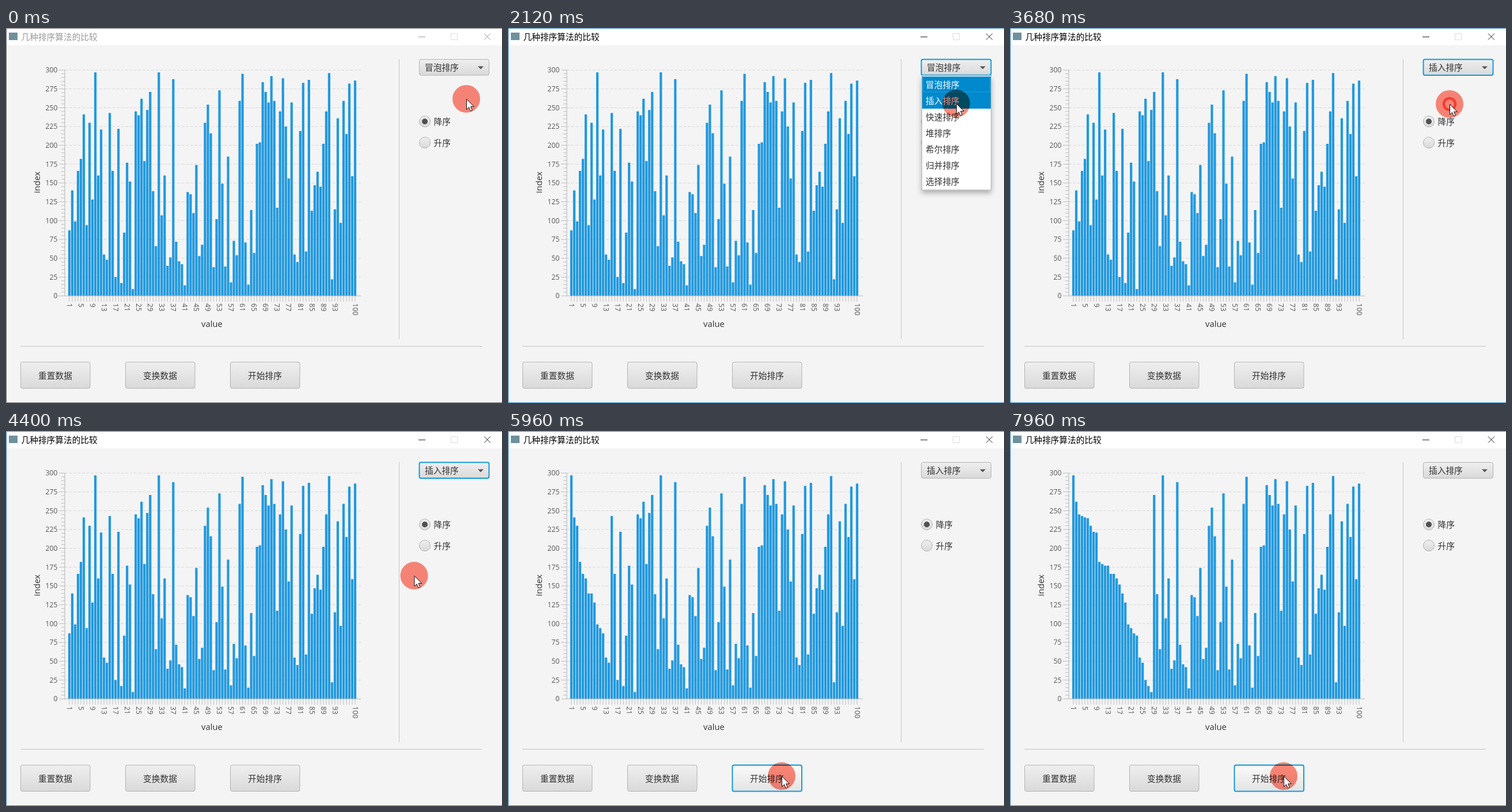
These frames come from a looping animation (861 px wide and 651 px high, 8000 ms). An HTML page:

```html
<!DOCTYPE html>
<html lang="zh">
<head>
<meta charset="utf-8">
<style>
  html, body { margin: 0; width: 100%; height: 100%; overflow: hidden; background: #f4f4f4; }
  svg { display: block; width: 861px; height: 651px; }
  text { font: 14.7px "Noto Sans CJK SC", "Noto Sans CJK", sans-serif; fill: #333; }
  .axis { font: 12.2px "Open Sans", "Noto Sans", sans-serif; fill: #555; }
  .name { font: 14.8px "Open Sans", "Noto Sans", sans-serif; fill: #333; }
  .mid { text-anchor: middle; }
  .end { text-anchor: end; }
  .line { fill: none; stroke: #c4c4c4; }
  .box { fill: url(#face); stroke: #b2b2b2; }
  .box.hover { fill: url(#bright); }
  .box.focus { stroke: #159bd7; stroke-width: 2; }
  .box.down { fill: #d4d4d4; }
</style>
</head>
<body>
<svg id="stage" viewBox="0 0 861 651" xmlns="http://www.w3.org/2000/svg"></svg>
<script>
const LOOP = 8000;
const SORT_START = 5423, SHIFT_MS = 12.35;
const ACTIVATE = 1120, OPEN = 1320, CHOOSE = 3600, START_PRESS = 5230;
const PRESSES = [[ACTIVATE, 1340], [3500, 3760], [START_PRESS, 5400]];
const LEFT = 110, STEP = 5.01, BASE = 465, UNIT = 392 / 300;

const values = [
  87, 140, 99, 166, 182, 241, 94, 230, 128, 297, 160, 221, 55, 48, 243, 166, 25, 222, 17, 84,
  177, 152, 9, 245, 240, 262, 179, 247, 271, 139, 66, 297, 107, 160, 40, 51, 288, 72, 46, 42,
  14, 138, 135, 110, 174, 53, 68, 230, 254, 216, 38, 102, 273, 149, 39, 185, 18, 73, 54, 259,
  295, 71, 15, 114, 57, 202, 204, 284, 271, 257, 292, 259, 117, 245, 289, 225, 156, 257, 55, 45,
  219, 283, 59, 287, 113, 147, 165, 145, 202, 245, 296, 22, 115, 236, 97, 259, 215, 282, 159, 286
];
const methods = ["冒泡排序", "插入排序", "快速排序", "堆排序", "希尔排序", "归并排序", "选择排序"];

// Pointer stops: time, x, y
const stops = [
  [0, 799, 123], [250, 799, 123], [950, 793, 68], [1420, 793, 68], [1720, 787, 83],
  [2120, 778, 131], [2500, 773, 184], [2650, 772, 184], [3280, 763, 132],
  [3820, 763, 132], [4200, 775, 152], [4860, 475, 599], [LOOP, 475, 599]
];

const range = n => [...Array(n).keys()];
const text = (x, y, s, cls = "", extra = "") => `<text x="${x}" y="${y}" class="${cls}" ${extra}>${s}</text>`;
const path = (d, extra = "") => `<path class="line" d="${d}" ${extra}/>`;
const box = (id, x, y, w, h) => `<rect id="${id}" class="box" x="${x}" y="${y}" width="${w}" height="${h}" rx="3"/>`;
const gradient = (id, top, bottom) =>
  `<linearGradient id="${id}" x2="0" y2="1"><stop stop-color="${top}"/><stop offset="1" stop-color="${bottom}"/></linearGradient>`;
const button = (id, x, label) => box(id, x + .5, 580, 120.5, 45.5) + text(x + 60.5, 608.5, label, "mid");
const radio = (y, label) =>
  `<circle class="box" cx="727" cy="${y}" r="9.5"/>` + text(742.5, y + 6, label);

function chart() {
  const yOf = v => BASE - v * UNIT;
  const xOf = i => LEFT + i * STEP;
  const majors = range(13).map(i => i * 25);
  const grid = majors.slice(1).map(v => `M102 ${yOf(v)}H616`).join("");
  const yTicks = range(61).map(i => `M${i % 5 ? 96 : 92} ${yOf(i * 5)}H102`).join("");
  const xTicks = range(100).map(i => `M${xOf(i)} ${BASE}V475`).join("");
  const xLabels = [...range(24).map(i => i * 4), 99].map(i =>
    text(0, 0, i + 1, "axis", `transform="translate(${xOf(i) - 4.3} 478) rotate(90)"`)).join("");
  return path(grid, 'stroke-dasharray="5 2.5" style="stroke:#dedede;stroke-width:1.25"')
    + path(yTicks + xTicks, 'style="stroke:#bdbdbd"')
    + `<path id="bars" fill="#2299de"/>`
    + path(`M102 73V${BASE}H616`, 'style="stroke:#b5b5b5"')
    + majors.map(v => text(89.5, yOf(v) + 4.4, v, "axis end")).join("")
    + xLabels
    + text(357.5, 519, "value", "name mid")
    + text(0, 0, "index", "name mid", 'transform="translate(59 268) rotate(-90)"');
}

function popup() {
  return `<g id="popup">
    <rect x="718.5" y="82.5" width="120" height="198.5" fill="#fff" stroke="#b8b8b8" filter="url(#shadow)"/>
    <rect x="719" y="84" width="119" height="28" fill="#0089cd"/>
    <rect x="720.5" y="84.5" width="116" height="26.5" fill="none" stroke="#289fd8"/>
    <rect id="hoverRow" x="719" width="119" height="28" fill="#0089cd"/>
    ${methods.map((m, i) => text(725, 103.5 + 28 * i, m, "method")).join("")}</g>`;
}

document.getElementById("stage").innerHTML = `
  <defs>${gradient("face", "#efefef", "#d9d9d9")}${gradient("bright", "#fafafa", "#e3e3e3")}
    <filter id="shadow" x="-20%" y="-20%" width="140%" height="140%">
      <feDropShadow dx="0" dy="5" stdDeviation="5" flood-opacity=".3"/></filter></defs>
  <rect width="861" height="651" fill="#f4f4f4"/>
  <rect width="861" height="30" fill="#fff"/>
  <rect x="5" y="8" width="15" height="13" fill="#70909c"/>
  ${text(26.5, 20.5, "几种排序算法的比较", "", 'id="title"')}
  ${path("M772.5 9.5h11v11h-11z", 'style="stroke:#dcdcdc"')}
  ${path("M716 15.5h12M830 9.5l11 11m0-11l-11 11", 'id="controls"')}
  ${path("M861 .5H.5V650.5H861", 'id="border"')}
  ${chart()}
  ${path("M682.5 54V540M25 552.5H826")}
  ${button("reset", 25, "重置数据")}
  ${button("shuffle", 207, "变换数据")}
  ${button("start", 389, "开始排序")}
  ${box("combo", 717.5, 54.5, 121, 27.5)}
  ${text(727, 74, "", "", 'id="choice"')}
  <path d="M819 66.5h10l-5 5z" fill="#555"/>
  ${radio(162.3, "降序")}${radio(199, "升序")}
  <circle cx="727" cy="162.3" r="5" fill="#505050"/>
  ${popup()}
  <g id="halo" style="mix-blend-mode:multiply">
    <circle r="24" fill="#ff897a"/>
    <circle id="ring" r="10" fill="none" stroke="#ff7468" stroke-width="4.5" style="mix-blend-mode:multiply"/>
  </g>
  <path id="pointer" d="M.5 .5V18.5L4.6 14.6 7.3 21 10.3 19.7 7.6 13.4H13.3Z" fill="#fff" stroke="#111"/>`;

const el = Object.fromEntries([...document.querySelectorAll("[id]")].map(e => [e.id, e]));
const methodTexts = document.querySelectorAll(".method");
const show = (e, on) => e.style.display = on ? "" : "none";

// Insertion sort, descending, stopped after a given number of shifts
function sortedAfter(shifts) {
  const a = [...values];
  for (let i = 1; i < a.length; i++) {
    const key = a[i];
    let j = i;
    while (j && a[j - 1] < key) {
      if (shifts-- <= 0) return a;
      a[j] = a[--j];
    }
    a[j] = key;
  }
  return a;
}

function pointerAt(t) {
  const k = stops.findIndex(s => s[0] > t);
  const [t0, x0, y0] = stops[k - 1], [t1, x1, y1] = stops[k];
  const p = (t - t0) / (t1 - t0), e = p * p * (3 - 2 * p);
  return [x0 + (x1 - x0) * e, y0 + (y1 - y0) * e];
}

function draw(now) {
  const t = now % LOOP;
  const [x, y] = pointerAt(t);
  const active = t >= ACTIVATE, open = t >= OPEN && t < CHOOSE, started = t >= START_PRESS;
  const pressed = PRESSES.some(([a, b]) => t >= a && t < b);

  el.title.style.fill = active ? "#000" : "#999";
  el.controls.style.stroke = active ? "#222" : "#999";
  el.border.style.stroke = active ? "#2b7fc0" : "#666";

  const overCombo = x > 717 && x < 839 && y > 54 && y < 82 && !open;
  const overStart = x > 389 && x < 510 && y > 580 && y < 626;
  el.combo.classList.toggle("hover", overCombo);
  el.combo.classList.toggle("focus", active && !started);
  el.start.classList.toggle("hover", overStart);
  el.start.classList.toggle("focus", started);
  el.start.classList.toggle("down", started && pressed);
  el.choice.textContent = methods[t < CHOOSE ? 0 : 1];

  show(el.popup, open);
  const row = Math.max(0, Math.min(6, Math.floor((y - 84) / 28)));
  el.hoverRow.setAttribute("y", 84 + 28 * row);
  show(el.hoverRow, row > 0);
  methodTexts.forEach((m, i) => m.style.fill = i === 0 || i === row ? "#fff" : "#333");

  const data = sortedAfter(Math.floor((t - SORT_START) / SHIFT_MS));
  el.bars.setAttribute("d", data.map((v, i) =>
    `M${(LEFT - 2.1 + i * STEP).toFixed(2)} ${BASE}v${(-v * UNIT).toFixed(2)}h4.2V${BASE}z`).join(""));

  const at = `translate(${x.toFixed(1)} ${y.toFixed(1)})`;
  el.halo.setAttribute("transform", at);
  el.pointer.setAttribute("transform", at);
  show(el.ring, pressed);
}

function frame() {
  draw(performance.now());
  requestAnimationFrame(frame);
}
frame();
</script>
</body>
</html>
```
